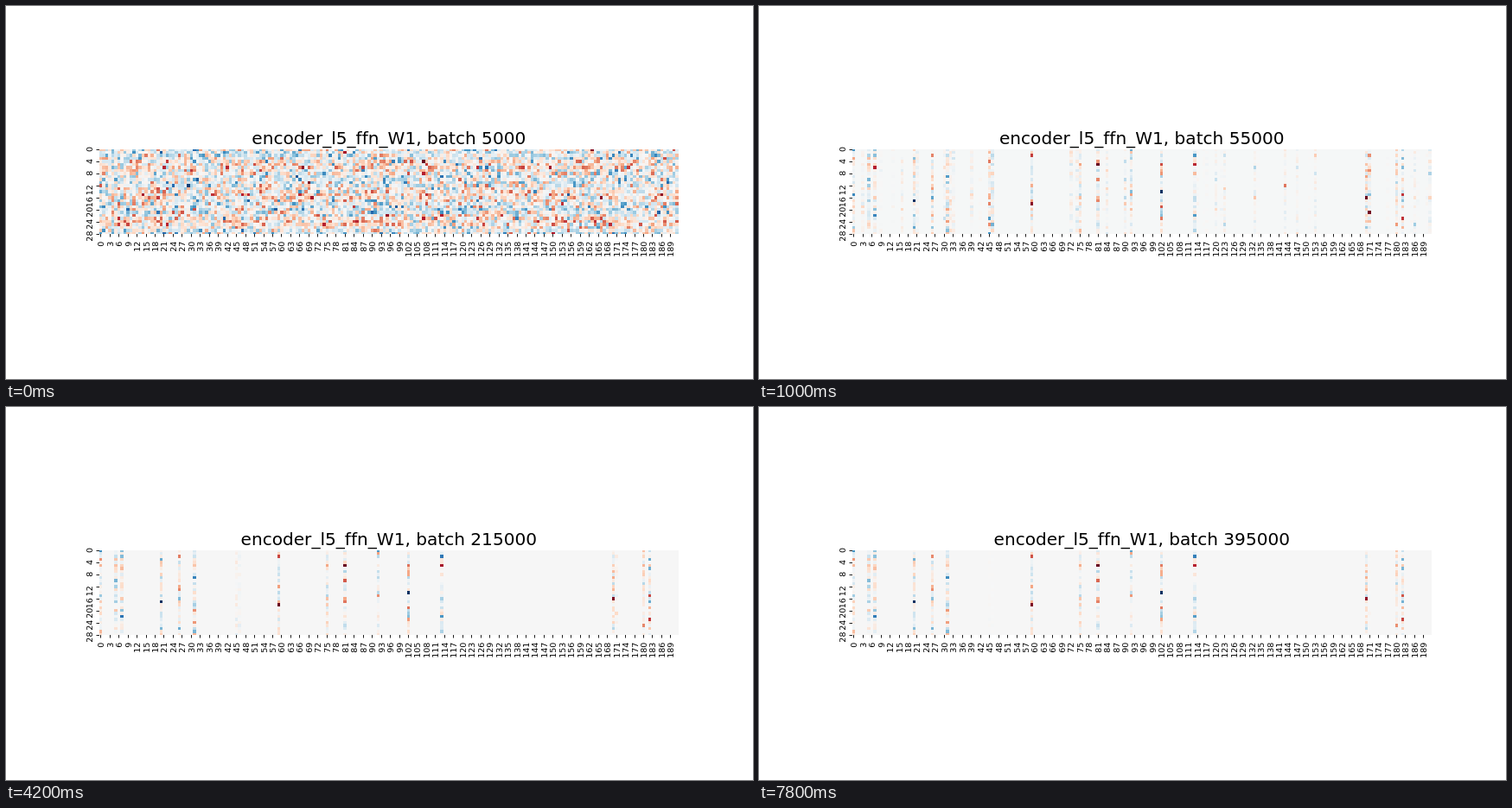
Animation, 864 px wide and 432 px high, one loop 8000 ms. Source, as an HTML page with a canvas:

```html
<!DOCTYPE html>
<html lang="en">
<head>
<meta charset="utf-8">
<title>Weight heatmap</title>
<style>
  html, body { margin: 0; width: 100%; height: 100%; overflow: hidden; background: #fff; }
  canvas, svg { position: absolute; left: 0; top: 0; }
  text { font: 9.5px "DejaVu Sans", sans-serif; font-variant-ligatures: none; text-anchor: end; }
  #title { font-size: 20.1px; text-anchor: middle; }
</style>
</head>
<body>
<canvas id="map" width="864" height="432"></canvas>
<svg id="labels" width="864" height="432"><text id="title" x="442.8" y="160"></text></svg>
<script>
const COLS = 192, ROWS = 29, LEFT = 108, TOP = 166, SIZE = 669.6 / COLS;
const BOTTOM = TOP + 28 * SIZE;
const STEP = 200, STEPS = 40;
const ctx = document.getElementById('map').getContext('2d');
const svg = document.getElementById('labels');
const title = document.getElementById('title');

// Diverging palette, from -1 (blue) to 1 (red)
const palette = ['053061', '2166ac', '4393c3', '92c5de', 'd1e5f0', 'f7f7f7',
  'fddbc7', 'f4a582', 'd6604d', 'b2182b', '67001f']
  .map(hex => [0, 2, 4].map(i => parseInt(hex.slice(i, i + 2), 16)));

// Columns that stay alive, die slowly, or die quickly
const lasting = [0, 5, 7, 20, 26, 31, 59, 75, 81, 92, 102, 113, 170, 180, 182];
const waning = [45, 46, 171];
const fading = [3, 16, 21, 30, 32, 33, 39, 72, 74, 84, 90, 120, 123, 133, 143, 147, 153, 186, 191];

function rand(c, r, seed) {
  let h = Math.imul(c + 1, 374761393) ^ Math.imul(r + 1, 668265263) ^ Math.imul(seed, 1274126177);
  h = Math.imul(h ^ h >>> 15, 2246822519);
  h = Math.imul(h ^ h >>> 13, 3266489917);
  return ((h ^ h >>> 16) >>> 0) / 4294967296;
}

function gauss(c, r, seed) {
  const radius = Math.sqrt(-2 * Math.log(1 - rand(c, r, seed)));
  return radius * Math.cos(2 * Math.PI * rand(c, r, seed + 50));
}

// Mostly pale values with a few strong ones
function sparse(c, r, seed) {
  const g = gauss(c, r, seed);
  return 0.15 * g * (1 + 0.25 * g * g);
}

function color(v) {
  const p = (Math.max(-1, Math.min(1, v)) + 1) * 5;
  const i = Math.min(9, Math.floor(p));
  return `rgb(${palette[i].map((a, n) => Math.round(a + (palette[i + 1][n] - a) * (p - i)))})`;
}

function value(c, r, k) {
  // Untrained noise: rows lean red and blue in turn
  if (k === 0) return 0.1 * Math.cos(2 * Math.PI * (r - 6) / 9) + 0.27 * gauss(c, r, 1);

  const age = Math.max(0, k - 2);
  const start = Math.exp(-age / 2);
  const young = 1.3 * sparse(c, r, 3);
  if (lasting.includes(c)) {
    if (c === 81 && r === 5) return 1; // the strongest weight
    const settled = sparse(c, r, 2) + (r === 5 ? 0.3 : 0);
    return young * start + settled * (1 - start) * (0.9 + 0.4 * Math.exp(-k / 12));
  }
  if (waning.includes(c)) return young * Math.exp(-age / 10);
  const noise = k === 1 ? 0.07 * gauss(c, r, 1) : 0;
  if (fading.includes(c)) return young * start + noise;
  return noise + (rand(c, 0, 9) < 0.1 ? 0.15 * young * start : 0);
}

function drawMap(k) {
  const ground = k > 2 && k < 19 ? '#f5f7f7' : '#f6f6f6';
  for (let r = 0; r < ROWS; r++) {
    const y0 = Math.round(Math.max(TOP, TOP + (r - 0.5) * SIZE));
    const y1 = Math.round(Math.min(BOTTOM, TOP + (r + 0.5) * SIZE));
    for (let c = 0; c < COLS; c++) {
      const x0 = Math.round(LEFT + c * SIZE), x1 = Math.round(LEFT + (c + 1) * SIZE);
      const v = value(c, r, k);
      ctx.fillStyle = Math.abs(v) < 0.004 ? ground : color(v);
      ctx.fillRect(x0, y0, x1 - x0, y1 - y0);
    }
  }
}

function label(text, x, y) {
  const el = document.createElementNS('http://www.w3.org/2000/svg', 'text');
  el.textContent = text;
  el.setAttribute('transform', `translate(${x} ${y}) rotate(-90)`);
  svg.append(el);
}

function drawAxes() {
  ctx.fillStyle = '#222';
  for (let c = 0; c < COLS; c += 3) {
    const x = LEFT + (c + 0.5) * SIZE;
    ctx.fillRect(Math.floor(x), 264, 1, 3.5);
    label(c, x + 3.5, 272.6);
  }
  for (let r = 0; r < ROWS; r += 4) {
    const y = TOP + r * SIZE;
    ctx.fillRect(104.5, Math.round(y), 3.5, 1);
    // A narrow leading 1 sets the label lower
    label(r, 99.8, y - (String(r).startsWith('1') ? 0.6 : 3.1));
  }
}

let shown = -1;
function tick() {
  const k = Math.floor(performance.now() / STEP) % STEPS;
  if (k !== shown) {
    shown = k;
    drawMap(k);
    title.textContent = `encoder_l5_ffn_W1, batch ${5000 + 10000 * k}`;
  }
  requestAnimationFrame(tick);
}

drawAxes();
tick();
</script>
</body>
</html>
```
